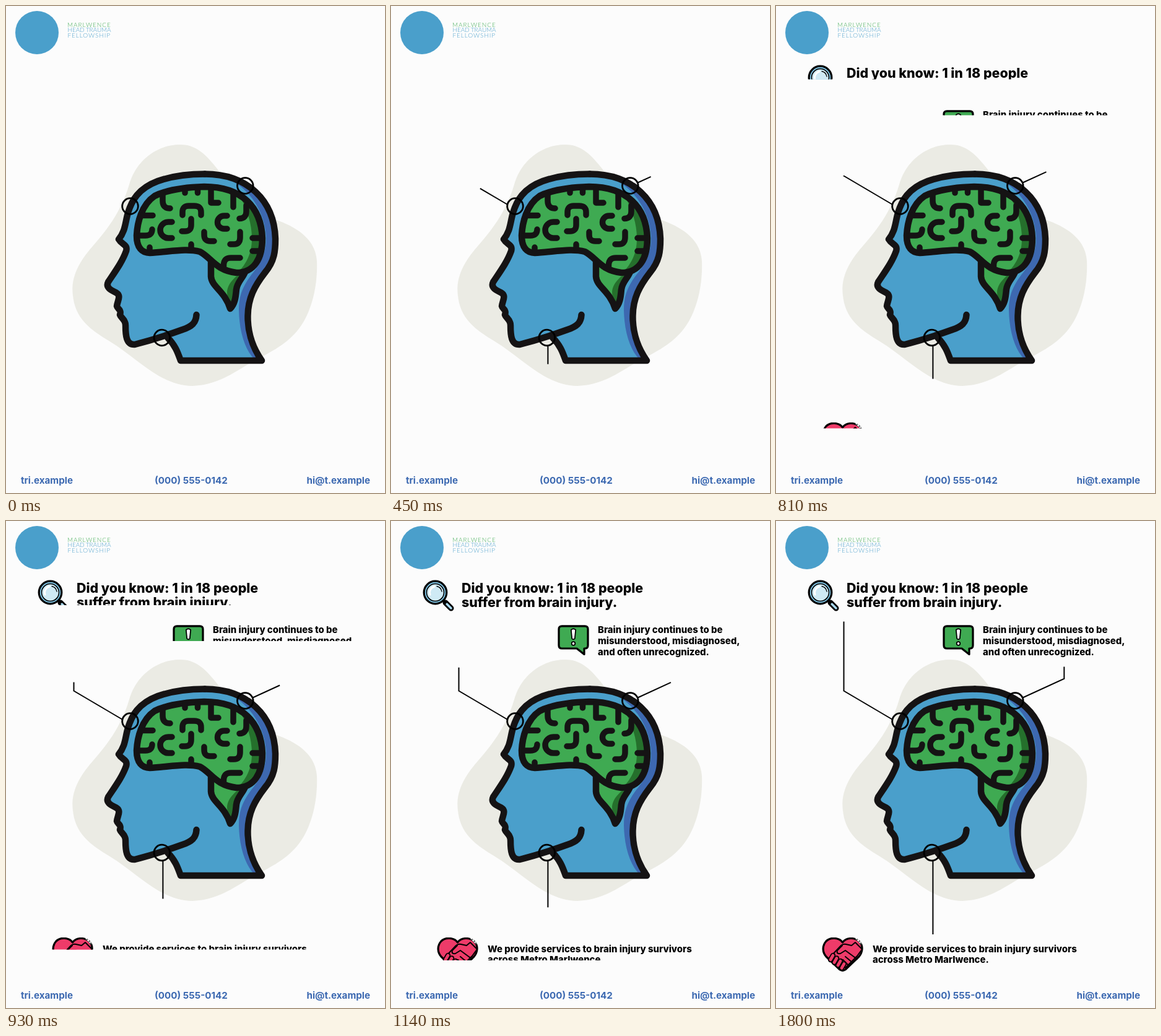
Animation, 612 px wide and 787 px high, one loop 3600 ms. Source, as an HTML page:

```html
<!DOCTYPE html>
<html lang="en">
<head>
<meta charset="utf-8">
<title>Brain injury facts</title>
<style>
  html, body { margin: 0; width: 100%; height: 100%; overflow: hidden; background: #fcfcfc; }
  svg { display: block; width: 612px; height: 787px; }
  text { font-family: Inter, "Open Sans", sans-serif; font-weight: 800; }
  .big { font-size: 21.4px; }
  .body { font-size: 14.9px; }
  .foot { font-size: 15.2px; font-weight: 700; fill: #3c69b1; }
  .brand { font-family: Lato, sans-serif; font-weight: 300; font-size: 10px; fill: #4a9fcb; }
  .ink { fill: none; stroke: #151314; stroke-width: 10.5; stroke-linecap: round; stroke-linejoin: round; }
  .fold { stroke-width: 9.5; }
  .thin { fill: none; stroke: #000; stroke-width: 2; }
  .ring { fill: none; stroke: #000; stroke-width: 2.8; }
  .icon { stroke: #000; stroke-width: 3.2; stroke-linejoin: round; stroke-linecap: round; }
</style>
</head>
<body>
<svg viewBox="0 0 612 787" xmlns="http://www.w3.org/2000/svg">
  <defs>
    <clipPath id="clip0"><rect x="40" y="95" width="540" height="0"/></clipPath>
    <clipPath id="clip1"><rect x="260" y="168" width="340" height="0"/></clipPath>
    <clipPath id="clip2"><rect x="60" y="673" width="500" height="0"/></clipPath>
  </defs>
  <rect width="612" height="787" fill="#fcfcfc"/>

  <!-- header -->
  <circle cx="50" cy="43" r="35" fill="#4a9fcb"/>
  <text class="brand" x="99" y="33.5" letter-spacing=".95" style="fill:#3faa52">MARLWENCE</text>
  <text class="brand" x="99.500" y="42" letter-spacing="-.1">HEAD TRAUMA</text>
  <text class="brand" x="99.500" y="51" letter-spacing=".9">FELLOWSHIP</text>

  <!-- backdrop -->
  <path fill="#ebebe4" d="M281 224C245 224 212 248 200 285C186 335 160 365 135 394C112 422 105 445 108 468C113 515 150 530 180 550C220 578 255 614 301 614C350 612 375 585 415 566C450 547 475 530 490 490C500 465 503 435 502 412C500 380 475 360 440 347C400 333 375 292 345 268C325 243 310 224 281 224Z"/>

  <!-- head -->
  <path id="fill" fill="#4a9fcb"/>
  <path fill="#3d68b0" d="M360 280C395 296 418 335 420 372C421 402 408 420 395 436C380 456 376 472 376 492C377 530 387 556 401 571H412C396 545 390 522 390 500C391 470 400 450 419 428C437 405 437 380 434 360C426 310 395 280 360 280Z"/>
  <path id="face" class="ink"/>
  <path id="neck" class="ink"/>

  <!-- brain -->
  <path fill="#3faa52" d="M331 412V437C332 454 353 460 362 489C371 480 371 466 372 458C373 447 382 440 386 428Z"/>
  <path fill="#25702c" d="M384 428C372 436 358 447 357 462C357 472 361 478 362 488C371 480 371 466 372 458C373 447 382 440 386 428Z"/>
  <path class="ink" d="M331 414V437C332 454 353 460 362 489C371 480 371 466 372 458C373 447 382 440 386 430"/>
  <path id="lobe" fill="#3faa52"/>
  <path fill="#25702c" d="M376 304C390 330 397 352 397 376C397 400 388 417 374 431C400 431 414 408 414 375C412 338 400 312 376 304Z"/>
  <path id="rim" class="ink"/>
  <g id="folds"></g>

  <!-- pointers -->
  <g id="lines"></g>
  <circle class="ring" cx="200.500" cy="323.500" r="12.800"/>
  <circle class="ring" cx="386.300" cy="290.500" r="12.800"/>
  <circle class="ring" cx="251.800" cy="536" r="12.800"/>

  <g clip-path="url(#clip0)">
    <path class="icon" fill="none" style="stroke-width:9" d="M88 132L97 141"/>
    <path class="icon" fill="none" style="stroke:#a9d9ee;stroke-width:3.5" d="M90 134L97 141"/>
    <path class="icon" fill="none" d="M84 128L88 132"/>
    <circle class="icon" cx="71.500" cy="115.500" r="18.300" fill="#7fc4e4"/>
    <circle class="icon" style="stroke-width:1.6" cx="71.500" cy="115.500" r="14" fill="#cfeaf5"/>
    <path fill="none" stroke="#fff" stroke-width="3" stroke-linecap="round" d="M63 119A10 10 0 0 1 70 106"/>
    <path fill="none" stroke="#000" stroke-width="1.300" stroke-linecap="round" d="M74 105.500A10.500 10.500 0 0 1 82 114"/>
    <text class="big" x="114" y="116">Did you know: 1 in 18 people</text>
    <text class="big" x="114" y="139">suffer from brain injury.</text>
  </g>

  <g clip-path="url(#clip1)">
    <path class="icon" fill="#3faa52" d="M276 169.800H313Q318 169.800 318 174.800V201Q318 206 313 206H312V215.500L300 206H276Q271 206 271 201V174.800Q271 169.800 276 169.800Z"/>
    <path class="icon" style="stroke-width:1.8" fill="#fff" d="M290.800 176Q294.500 172.500 298.200 176L296.800 190Q294.500 192.500 292.200 190Z"/>
    <circle class="icon" style="stroke-width:1.8" cx="294.500" cy="198" r="2.800" fill="#fff"/>
    <text class="body" x="334" y="180.800">Brain injury continues to be</text>
    <text class="body" x="334" y="199">misunderstood, misdiagnosed,</text>
    <text class="body" x="334" y="217.200">and often unrecognized.</text>
  </g>

  <g clip-path="url(#clip2)">
    <path class="icon" fill="#ee3b69" d="M107.500 681C102 673 88 672 81 679C74 687 75 697 81 704L103 725Q107.500 728 112 725L134 704C140 697 141 687 135 680C127 672 113 673 107.500 681Z"/>
    <path class="icon" style="stroke-width:2" fill="#ee3b69" d="M88 704L105 686Q108 683 113 684L122 686L128 681L139 692L131 703L112 722"/>
    <path class="icon" style="stroke-width:2" fill="#ee3b69" d="M107 686L99 694Q97 700 104 699L112 694L131 708"/>
    <g id="fingers"></g>
    <path class="icon" style="stroke-width:2" fill="none" d="M112 704L124 714M108 709L118 719"/>
    <path fill="none" stroke="#fcfcfc" stroke-width="2.500" d="M129 674L138 683"/>
    <path fill="none" stroke="#000" stroke-width="1.600" stroke-linecap="round" d="M131 676V676.500M134.500 679V679.500M137 682V682.500"/>
    <text class="body" x="156" y="696.500">We provide services to brain injury survivors</text>
    <text class="body" x="156" y="714.300">across Metro Marlwence.</text>
  </g>

  <!-- footer -->
  <text class="foot" x="24" y="772.300">tri.example</text>
  <text class="foot" x="299" y="772.300" text-anchor="middle">(000) 555-0142</text>
  <text class="foot" x="588" y="772.300" text-anchor="end">hi@t.example</text>
</svg>
<script>
const LOOP = 3600, STEP = 30, STEPS = 60;
const $ = id => document.getElementById(id);

function add(parent, tag, attrs) {
  const el = document.createElementNS("http://www.w3.org/2000/svg", tag);
  for (const k in attrs) el.setAttribute(k, attrs[k]);
  return $(parent).appendChild(el);
}

const face = "C290 271.500 262 277 245 283C213 295 203 315 197 334C192 352 193 363 182 377" +
  "C187 386 197 385 194 396C188 413 177 428 165 446C160 456 172 460 179 464C186 469 180 476 179 485" +
  "C180 490 187 490 184 499C186 505 193 506 193 516C193 532 194 548 208 547";
const neck = "C273 548 277 559 282 573H413C396 549 390 522 390.500 500C391 472 401 453 418 431" +
  "C434 412 435 395 435 376C433 314 390 271.500 321 271.500";
const lobe = "M320 292C288 293 258 298 240 307C219 321 212 350 211 371C211 391 220 399 232 399" +
  "C265 397 292 391 313 397C331 406 338 427 372 431C401 431 414 408 414 375C412 326 382 292 320 292Z";

$("fill").setAttribute("d", "M321 271.500" + face + "L258 533" + neck + "Z");
$("face").setAttribute("d", "M321 271.500" + face + "C235 540 260 532 285 523C300 518 307 512 307.500 499");
$("neck").setAttribute("d", "M261 536" + neck);
$("lobe").setAttribute("d", lobe);
$("rim").setAttribute("d", lobe);

[
  "M253 304V315Q253 327 265 327", "M289 295V302", "M309.500 295V302", "M331 296V318H343",
  "M367 303V325", "M388 322V332Q388 343 377 343.500", "M218 338.500H237",
  "M268 349H262A13 13 0 0 0 262 375H268", "M285 338V333Q285 323 295 323H304Q315 323 315 333V338",
  "M299 344V354Q299 364 289 364H284", "M357 339H352A10.500 10.500 0 0 0 352 360H357",
  "M320 365V370Q320 380 330 380H336", "M378 365V374Q378 385 368 385H362",
  "M216 371H225Q236 371 236 361", "M232 390V393", "M299 385V392",
  "M398 375H412M398 396H412", "M351.500 421V418Q352 407 363 407H378"
].forEach(d => add("folds", "path", { class: "ink fold", d }));

for (let i = 0; i < 4; i++) {
  const x = 88 + i * 6, y = 706 + i * 4.5;
  const d = `M${x + 4} ${y - 4}L${x} ${y + 3}`;
  add("fingers", "path", { class: "icon", d, style: "stroke-width:8.5" });
  add("fingers", "path", { class: "icon", d, style: "stroke:#ee3b69;stroke-width:4.8" });
}

const lines = [
  [[187.5, 320.5], [109.5, 274.5], [109.5, 162.5]],
  [[398.5, 285.5], [465.3, 254.8], [465.3, 235.5]],
  [[253.4, 549], [253.4, 668]]
].map(pts => ({ pts, el: add("lines", "path", { class: "thin" }) }));

// Top-down wipes: first step, pixels per step, full height
const wipes = [[21.63, 4.375, 52], [25.05, 4.375, 52], [23.2, 2.5, 58]]
  .map(([from, speed, max], i) => ({ from, speed, max, el: document.querySelector(`#clip${i} rect`) }));

// Portion p of a polyline, measured along its length
function partial(pts, p) {
  const seg = pts.slice(1).map((b, i) => Math.hypot(b[0] - pts[i][0], b[1] - pts[i][1]));
  let left = p * seg.reduce((a, b) => a + b, 0);
  let d = "M" + pts[0];
  for (let i = 0; i < seg.length && left > 0; i++) {
    const k = Math.min(1, left / seg[i]), a = pts[i], b = pts[i + 1];
    d += "L" + [a[0] + (b[0] - a[0]) * k, a[1] + (b[1] - a[1]) * k];
    left -= seg[i];
  }
  return d;
}

function render(ms) {
  const n = Math.min(STEPS, Math.floor(ms / STEP));
  for (const { pts, el } of lines) el.setAttribute("d", partial(pts, n / STEPS));
  for (const { from, speed, max, el } of wipes)
    el.setAttribute("height", Math.max(0, Math.min(max, (n - from) * speed)));
}

const start = performance.now();
function tick() {
  render((performance.now() - start) % LOOP);
  requestAnimationFrame(tick);
}
tick();
</script>
</body>
</html>
```
